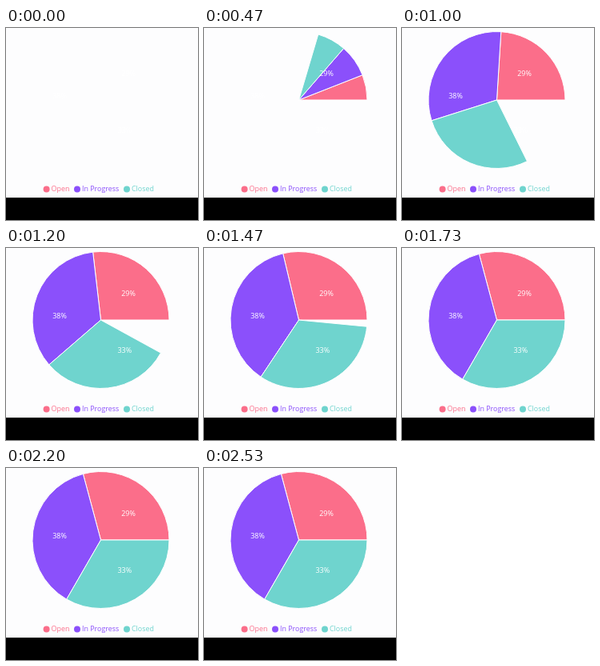
Recreate the animation shown at these times as an HTML page. Size 240x240 px, loop 2.59 s.

```html
<!DOCTYPE html>
<html lang="en">
<head>
<meta charset="utf-8">
<title>Status pie</title>
<style>
  html, body { margin: 0; width: 100%; height: 100%; overflow: hidden; background: #fdfdfe; }
  svg { display: block; width: 100vw; height: 100vh; }
  text { font: 9px "Open Sans", "Noto Sans", sans-serif; }
  .share { fill: #fff; text-anchor: middle; }
  .legend text { font-size: 8.9px; }
  path { stroke: #fff; stroke-width: 1; stroke-linejoin: round; }
</style>
</head>
<body>
<svg viewBox="0 0 240 240">
  <g id="slices"></g>
  <g id="shares"></g>
  <g id="legend" class="legend"></g>
  <rect y="212" width="240" height="28" fill="#000"/>
</svg>
<script>
const LOOP = 2590, BEGIN = 233, DURATION = 1470;
const CX = 118.5, CY = 90, R = 85.5;

const series = [
  { name: 'Open', count: 7, color: '#fb6e8a', label: [153, 59.5], dot: 50.6, text: 56.6 },
  { name: 'In Progress', count: 9, color: '#8b50fb', label: [67, 87.7], dot: 89, text: 95 },
  { name: 'Closed', count: 8, color: '#6fd4ce', label: [148.3, 130.5], dot: 151, text: 157 }
];
const total = series.reduce((sum, s) => sum + s.count, 0);

function add(parent, tag, attrs, content = '') {
  const el = document.createElementNS('http://www.w3.org/2000/svg', tag);
  for (const key in attrs) el.setAttribute(key, attrs[key]);
  el.textContent = content;
  return document.getElementById(parent).appendChild(el);
}

for (const s of series) {
  const percent = Math.round(s.count / total * 100) + '%';
  s.path = add('slices', 'path', { fill: s.color });
  add('shares', 'text', { class: 'share', x: s.label[0], y: s.label[1] }, percent);
  add('legend', 'circle', { cx: s.dot, cy: 201.6, r: 4, fill: s.color });
  add('legend', 'text', { x: s.text, y: 204.3, fill: s.color }, s.name);
}

// CSS "ease": cubic-bezier(.25, .1, .25, 1)
function ease(x) {
  if (x <= 0) return 0;
  if (x >= 1) return 1;
  const curve = (a, b, u) => 3 * a * u * (1 - u) ** 2 + 3 * b * u * u * (1 - u) + u ** 3;
  let lo = 0, hi = 1;
  for (let i = 0; i < 24; i++) {
    const mid = (lo + hi) / 2;
    if (curve(.25, .25, mid) < x) lo = mid; else hi = mid;
  }
  return curve(.1, 1, lo);
}

// Angles in turns, counter-clockwise from three o'clock
function point(turn) {
  const a = turn * 2 * Math.PI;
  return `${(CX + R * Math.cos(a)).toFixed(2)} ${(CY - R * Math.sin(a)).toFixed(2)}`;
}

function sector(from, to) {
  if (to <= from) return '';
  const large = to - from > .5 ? 1 : 0;
  return `M${CX} ${CY}L${point(from)}A${R} ${R} 0 ${large} 0 ${point(to)}Z`;
}

// Holds each pose for 1/15 s, on a 10 ms clock
function stepped(ms) {
  const step = Math.floor((Math.floor(ms / 10) + .5) * .15);
  return step * 1000 / 15;
}

function draw(ms) {
  const sweep = ease((stepped(ms) - BEGIN) / DURATION);
  let turn = 0;
  for (const s of series) {
    const end = turn + s.count / total * sweep;
    s.path.setAttribute('d', sector(turn, end));
    turn = end;
  }
}

const start = performance.now();
function tick() {
  draw((performance.now() - start) % LOOP);
  requestAnimationFrame(tick);
}
tick();
</script>
</body>
</html>
```
